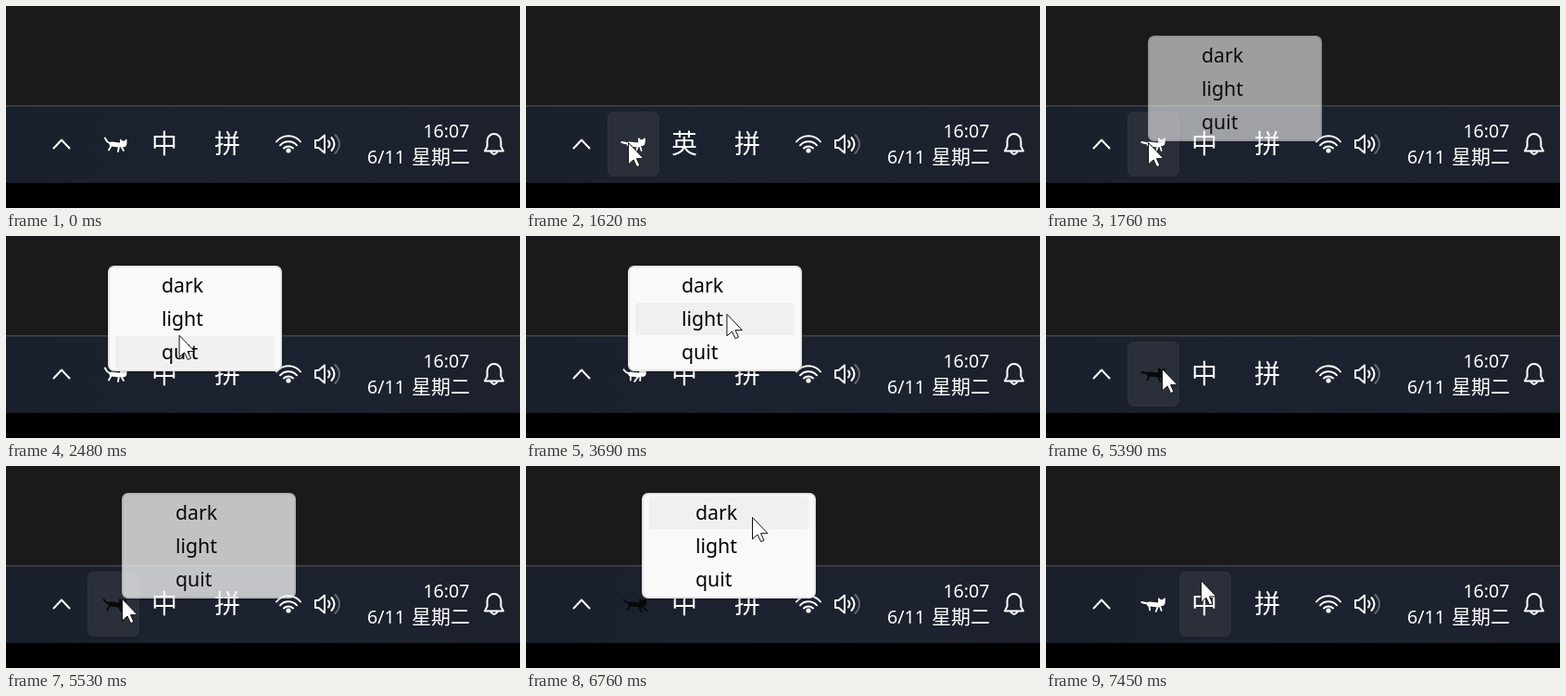
Animation, 555 px wide and 218 px high, one loop 7470 ms. Source, as an HTML page:

```html
<!DOCTYPE html>
<html lang="zh">
<head>
<meta charset="utf-8">
<title>Tray cat</title>
<style>
  html, body { margin: 0; width: 100%; height: 100%; overflow: hidden; background: #000; }
  svg { display: block; width: 555px; height: 218px; }
  text { font-family: "Noto Sans", "Open Sans", sans-serif; }
  .cjk { font-family: "Noto Sans CJK SC", "Noto Sans CJK", sans-serif; }
  .line { fill: none; stroke: #fff; stroke-width: 2; stroke-linecap: round; stroke-linejoin: round; }
  .tile { fill: #2a2f3a; stroke: #2f343f; }
</style>
</head>
<body>
<svg viewBox="0 0 555 218">
  <defs>
    <linearGradient id="bar">
      <stop offset="0" stop-color="#1a202b"/>
      <stop offset=".5" stop-color="#1c2230"/>
      <stop offset="1" stop-color="#1c212c"/>
    </linearGradient>
  </defs>
  <rect width="555" height="107" fill="#1a1a1a"/>
  <rect y="107" width="555" height="84" fill="url(#bar)"/>
  <rect y="107" width="555" height="1.5" fill="#424448"/>

  <rect id="catTile" class="tile" x="88.5" y="114.5" width="55" height="69" rx="6"/>
  <rect id="imeTile" class="tile" x="144.5" y="114.5" width="55" height="69" rx="6"/>

  <path class="line" d="M51.5 153.5 60 144.5 68.5 153.5"/>
  <g id="cat" fill="none" stroke-linecap="round" stroke-linejoin="round">
    <path id="tail" stroke-width="2"/>
    <path id="body" stroke-width="5"/>
    <path id="legs" stroke-width="1.8"/>
    <path id="head" stroke-width="1"/>
  </g>

  <g fill="#fff" font-size="28" text-anchor="middle">
    <text id="ime" class="cjk" x="171" y="158.5">中</text>
    <text class="cjk" x="239" y="158.5">拼</text>
  </g>

  <g class="line">
    <path d="M292 146.5A16.5 16.5 0 0 1 318 146.5M296 150.3A12 12 0 0 1 314 150.3M300 153.5A7 7 0 0 1 310 153.5"/>
    <circle cx="305" cy="156" r="1.6" fill="#fff"/>
    <path d="M334 145h3.5l6.5-5.5v19l-6.5-5.5h-3.5z"/>
    <path d="M348 145.5q3 3.5 0 7M351.5 142q6 7 0 14"/>
    <path d="M355.5 139q9 10 0 20" stroke="#626770"/>
    <path d="M517 156.5h20l-2.6-5v-6a7.4 7.4 0 0 0-14.800 0v6zM523.5 157.5q3.5 5 7 0"/>
  </g>

  <g fill="#fff" text-anchor="end">
    <text x="500.5" y="142" font-size="19.6">16:07</text>
    <text x="431" y="170" font-size="19.6">6/11</text>
    <text class="cjk" x="501" y="170" font-size="21">星期二</text>
  </g>

  <g id="menu">
    <rect x="-1" y="0" width="190" height="116" rx="8" opacity=".15"/>
    <rect x=".75" y=".75" width="186.5" height="112.5" rx="6" fill="#f9f9f9" stroke="#dcdcdc" stroke-width="1.5"/>
    <rect id="hot" x="8" width="172" height="35" rx="3" fill="#f0f0f0"/>
    <g font-size="21.3">
      <text x="58" y="29">dark</text>
      <text x="58" y="65">light</text>
      <text x="58" y="101">quit</text>
    </g>
  </g>

  <path id="cursor" d="M.5.5V24L6 19l3.7 7.7 3.3-1.5L9.5 17.7H17z" fill="#fff" stroke="#111"/>
</svg>
<script>
const LOOP = 7470, STRIDE = 1140, POSES = 5, FADE = 120;
const $ = id => document.getElementById(id);
const set = (id, attrs) => {
  for (const name in attrs) $(id).setAttribute(name, attrs[name]);
};
const clamp = v => Math.max(0, Math.min(1, v));
const ease = u => 1 - (1 - u) ** 1.3;

// Pointer glides: from, to, then the resting place
const glides = [
  [100, 840, 122, 127],
  [1000, 1400, 110, 147],
  [2120, 2650, 209, 95],
  [2970, 3130, 225, 60],
  [3490, 3750, 215, 88],
  [4300, 5000, 125, 143],
  [5820, 6210, 233, 88],
  [6390, 6550, 244, 55],
  [6900, LOOP, 166, 124]
];

const menus = [
  { left: 110, top: 32, open: 1690, close: 4060 },
  { left: 125, top: 29, open: 5440, close: 6780 }
];

function pointer(t) {
  let x = 173, y = -30;
  for (const [from, to, endX, endY] of glides) {
    const k = ease(clamp((t - from) / (to - from)));
    x += (endX - x) * k;
    y += (endY - y) * k;
  }
  return { x, y };
}

// One gallop in five poses: "stretch" lengthens the cat, "swing" moves its feet
function drawCat(t) {
  const angle = Math.floor(t / STRIDE * POSES) * 2 * Math.PI / POSES;
  const stretch = (1 - Math.cos(angle)) / 2, swing = Math.sin(angle);
  const rump = 114 - 3 * stretch, chest = 122 - stretch;
  const hind = 111 + 2 * swing, fore = 126 - 4 * swing;
  const headX = 126.5 - 2 * stretch, headY = 148.5 - 1.5 * stretch;
  const dark = t >= menus[0].close && t < menus[1].close;
  const color = dark ? "#080909" : "#fff";
  set("tail", { d: `M${107 - 4 * stretch} ${142.5 + 5 * stretch}Q${rump - 5} 148 ${rump} 148.5` });
  set("body", { d: `M${rump} 149 ${chest} 150` });
  set("legs", { d: `M${rump} 150 ${hind} 155.5M${chest} 151 ${fore - 5} 157M${chest + 2} 151 ${fore + 1} 156` });
  set("head", {
    d: `M${headX - 3} ${headY}v-4.5l2.2 2h2l2.3-2v4.5q0 3.500-3.200 3.500t-3.300-3.500z`,
    fill: color
  });
  set("cat", { stroke: color });
}

// Draws the menu and tells whether the pointer is over it
function drawMenu(t, { x, y }) {
  const { left, top, open, close } = menus.find(m => t < m.close + FADE) || menus[1];
  const opacity = clamp((t - open) / FADE) * clamp((close + FADE - t) / FADE);
  const row = Math.floor((y - top - 2.5) / 36);
  const over = opacity > 0 && x >= left && x < left + 188 && row >= 0 && row < 3;
  set("menu", { transform: `translate(${left} ${top})`, opacity });
  set("hot", { y: 4 + row * 36, opacity: over ? 1 : 0 });
  return over;
}

// Tiles light up as the pointer passes their edge
const glow = ({ x, y }, left) => clamp(Math.min(x - left, left + 56 - x, y - 108) / 10);

function draw(t) {
  const tip = pointer(t);
  drawCat(t);
  const lit = drawMenu(t, tip) ? 0 : 1;
  set("catTile", { opacity: lit * glow(tip, 88) });
  set("imeTile", { opacity: lit * glow(tip, 144) });
  $("ime").textContent = t >= 900 && t < 1660 ? "英" : "中";
  set("cursor", { transform: `translate(${tip.x} ${tip.y})` });
}

const start = performance.now();
function tick() {
  draw((performance.now() - start) % LOOP);
  requestAnimationFrame(tick);
}
tick();
</script>
</body>
</html>
```
